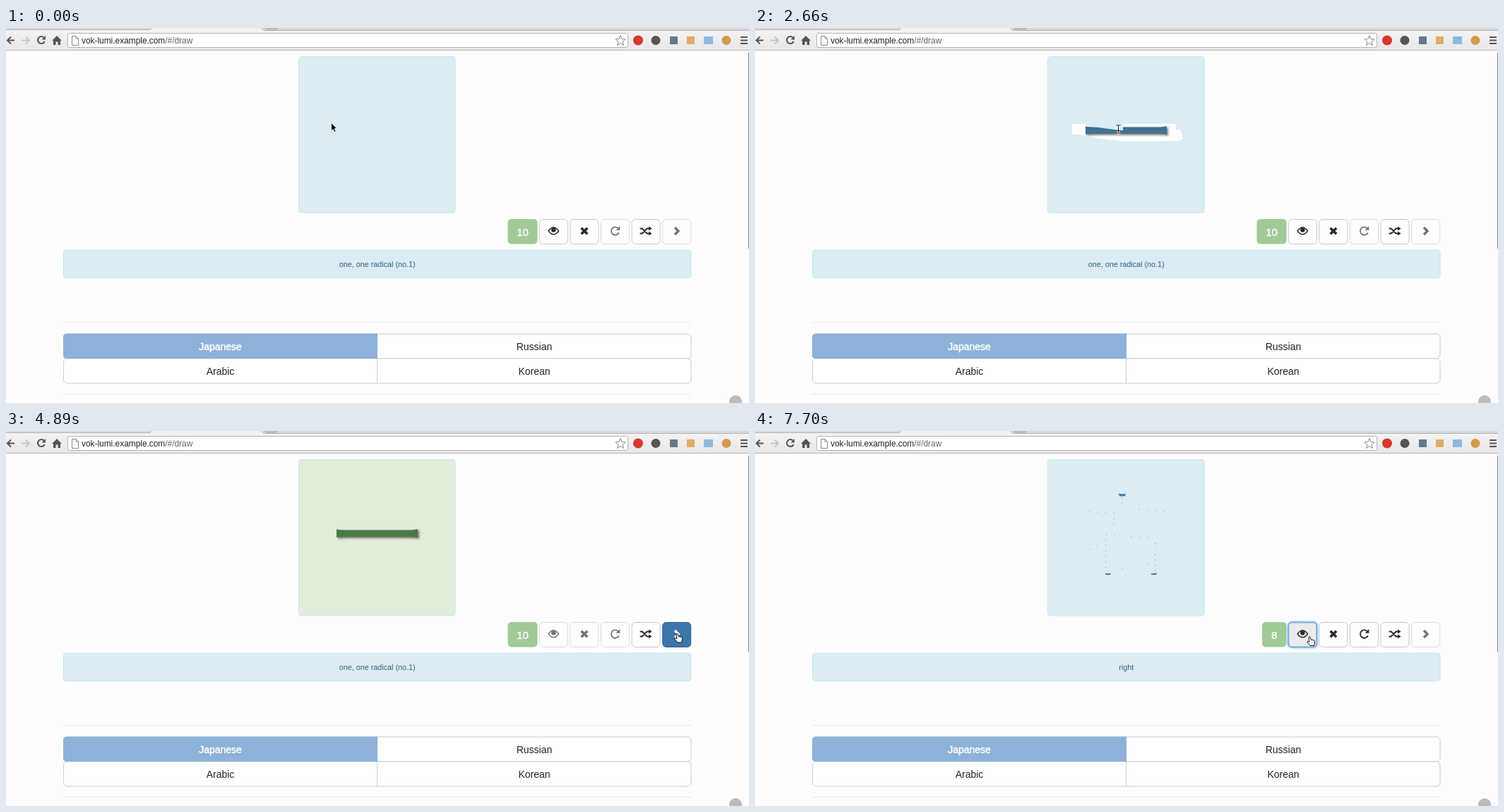
Write an HTML page that moves like this. It is 1052x532 px and loops after 7.99 s.

```html
<!DOCTYPE html>
<html lang="en">
<head>
<meta charset="utf-8">
<title>Character drawing practice</title>
<style>
  html, body { margin: 0; width: 100%; height: 100%; overflow: hidden; background: #fdfdfd; }
  svg { display: block; width: 100%; height: 100%; }
  text { font: 14px "Liberation Sans", Arial, sans-serif; fill: #222; text-anchor: middle; }
  #url { font-size: 11.9px; text-anchor: start; }
  #hint { font-size: 10.8px; fill: #3a5f7a; }
  .light { fill: #fff; stroke: #fff; stroke-width: .4; }
  #badge text { font-size: 15px; }
  .line { fill: none; stroke: currentColor; }
  .info { fill: #dbecf4; stroke: #c3e6ee; }
  .box { fill: #fff; stroke: #ccc; }
  .button { color: #2b2b2b; }
  .button > rect { fill: #fff; stroke: #c8c8c8; }
  .off { opacity: .65; }
  .hover > rect { fill: #ebebeb; stroke: #adadad; }
  .press > rect { fill: #dcdcdc; }
  .go { color: #fff; }
  .go > rect { fill: #4f8cc5; stroke: #427fb9; }
  .go.hover > rect { fill: #3c74ac; stroke: #30608f; }
  .focus > rect { stroke: #79aee8; stroke-width: 2; filter: drop-shadow(0 0 1.5px #66afe9); }
  #bar { filter: drop-shadow(2px 2px 1.5px rgba(0,0,0,.5)); }
  .dots path { fill: none; stroke: #6d91ac; stroke-width: 1; }
  .dots .across { stroke-dasharray: 1 10.7; }
  .dots .down { stroke-dasharray: 1 6.8; }
</style>
</head>
<body>
<svg viewBox="0 0 1052 532" preserveAspectRatio="none">
  <defs>
    <linearGradient id="chrome" x2="0" y2="1">
      <stop stop-color="#f4f4f4"/><stop offset="1" stop-color="#e7e7e7"/>
    </linearGradient>
    <mask id="scratched" maskUnits="userSpaceOnUse" x="414" y="40" width="222" height="222">
      <g fill="none" stroke="#fff" stroke-width="15">
        <path id="sweep1" d="M449 143.5H462L480 148 500 150.5 521 153H596L604 150.5"/>
        <path id="sweep2" d="M596 143.5H466"/>
      </g>
    </mask>
  </defs>

  <!-- browser toolbar -->
  <rect width="1052" height="32" fill="url(#chrome)"/>
  <path d="M0 0H1052V3H0Z" fill="#d8d8d8"/>
  <path d="M207 0H362L365 3H204Z" fill="#f1f1f1"/>
  <path d="M0 2.5H52M203 3.5L206 0M361 0L365 3.5H1052M52 2.5H203M0 31.5H1052" class="line" color="#b5b5b5"/>
  <path d="M366 0H385Q385 3 381 3H370Q367 3 366 0Z" fill="#bbb"/>
  <rect x="87.5" y="7.5" width="793" height="20" rx="2" fill="#fff" stroke="#b4b4b4"/>
  <g class="line" color="#555" stroke-width="2">
    <path d="M12 17.5H2M7 12.5L2 17.5 7 22.5"/>
    <path d="M22 17.5H33M28 12.5L33 17.5 28 22.5" color="#c6c6c6"/>
    <path d="M54.6 19A5 5 0 1 1 53.5 13.5"/>
    <path d="M56 11V16.5H50.5Z" fill="#555" stroke="none"/>
    <path d="M72 11L79 18H77V24H73.500V19.500H70.500V24H67V18H65Z" fill="#555" stroke="none"/>
    <path d="M1040 13H1050M1040 17.500H1050M1040 22H1050"/>
  </g>
  <path d="M93.500 11.500H99L102.500 15V24.500H93.500ZM99 11.500V15H102.500" fill="#fff" stroke="#888"/>
  <path d="M870 10.500L872 15.500 877 16 873 19.500 874.500 24.500 870 21.500 865.500 24.500 867 19.500 863 16 868 15.500Z" fill="#fff" stroke="#888"/>
  <text id="url" x="107" y="22">vok-lumi.example.com<tspan fill="#666">/#/draw</tspan></text>
  <circle cx="895" cy="17.500" r="7" fill="#d8382f"/>
  <circle cx="920" cy="17.500" r="6.500" fill="#555"/>
  <rect x="940" y="12" width="11" height="11" fill="#65788c"/>
  <rect x="964" y="12" width="11" height="11" fill="#e2ab66"/>
  <rect x="988" y="12" width="13" height="11" fill="#8db9df"/>
  <circle cx="1020" cy="17.500" r="6.500" fill="#d39a4e"/>

  <!-- page -->
  <path d="M1051.500 35V313" class="line" color="#8a8a8a"/>
  <circle cx="1033" cy="530" r="9" fill="#bcbcbc"/>
  <path d="M81 417.500H970M81 519.500H970" class="line" color="#e9e9e9"/>
  <rect x="81.500" y="315" width="888.500" height="39.500" rx="4" class="info"/>
  <text id="hint" x="525.700" y="339"></text>

  <rect x="81.500" y="434" width="888.500" height="35" rx="5" class="box"/>
  <rect x="81.500" y="469" width="888.500" height="35" rx="5" class="box"/>
  <path d="M525.500 434V504" class="line" color="#ccc"/>
  <path d="M526 433.500H86Q81 433.500 81 438.500V464Q81 469 86 469H526Z" fill="#8db2d7"/>
  <text x="303.500" y="456.500" class="light">Japanese</text>
  <text x="748" y="456.500">Russian</text>
  <text x="303.500" y="491.500">Arabic</text>
  <text x="748" y="491.500">Korean</text>

  <!-- drawing panel -->
  <rect id="panel" x="414.500" y="40.500" width="221.500" height="221.500" rx="4" class="info"/>
  <g id="reveal">
    <rect id="paper" x="415" y="41" width="220" height="220" fill="#fff"/>
    <path id="bar" d="M468 139.500Q473 140.500 484 140.500H567Q578 140.500 583 139V151Q578 150 567 150H484Q473 150 468 151Z"/>
  </g>
  <g id="starts" fill="#4377a3">
    <path d="M515 88.500L519 89.500 525 89 524 92.500H516Z"/>
    <path d="M495.500 202H504L503 204H496.500ZM560.500 202.500L569 201.500 568 204H561.500Z"/>
  </g>
  <g id="guides" class="dots">
    <path class="across" d="M473 114.500L532 118.500M543 111.500L579 114M497 147.500L567 152M508 194L532 196.500M473 168.500L486 162M555 189.500H556"/>
    <path class="down" d="M519.500 94V104M508 124.500V134M496.500 154V199M566.500 159V200"/>
  </g>

  <g id="badge">
    <rect y="271" height="35.500" rx="5" fill="#a1ca97"/>
    <text y="294.500" class="light"></text>
  </g>
  <g id="buttons"></g>

  <g id="cursor">
    <path id="arrow" d="M0 0V11.500L2.700 9 4.500 13.200 6.500 12.300 4.700 8.300H8Z" fill="#000" stroke="#fff" stroke-width=".8"/>
    <g id="beam" fill="none">
      <path d="M-3-6Q0-6 0-4Q0-6 3-6M0-5V5M-3 6.500Q0 6.500 0 4.500Q0 6.500 3 6.500M-2 2H2" stroke="#fff" stroke-width="2.600"/>
      <path d="M-3-6Q0-6 0-4Q0-6 3-6M0-5V5M-3 6.500Q0 6.500 0 4.500Q0 6.500 3 6.500M-2 2H2" stroke="#111"/>
    </g>
    <path id="hand" d="M-3-5.500Q-2-7.500-.8-5.500L.5-1.500Q2-2.500 3-1.300Q4.500-2 5.200 0Q6 2 5 4V6.500H-1L-5 2Q-5.500 0-3.500 .5L-2 1.500Z" fill="#fff" stroke="#111"/>
  </g>
</svg>
<script>
const DURATION = 7990;
const SUCCESS = 3260, NEXT = 5030, FIRST_HELP = 6660, SECOND_HELP = 7700;
const el = id => document.getElementById(id);
const set = (node, attrs) => { for (const k in attrs) node.setAttribute(k, attrs[k]); };
const show = (id, on) => set(el(id), { display: on ? 'inline' : 'none' });

// Each icon: outline, line weight, solid part; centred on 0,0
const icons = {
  eye: ['M-7.200 0Q0-10.500 7.200 0Q0 9.500-7.200 0Z', 1.4, 'M-3.200-1.500a3.200 3.200 0 1 0 6.400 0a3.200 3.200 0 1 0-6.400 0'],
  clear: ['M-4.300-4.300L4.300 4.300M4.300-4.300L-4.300 4.300', 3.6, ''],
  redo: ['M5.300 2.500A5.700 5.700 0 1 1 4-4.200', 1.8, 'M6.800-7V-1.200H1Z'],
  shuffle: ['M-8.500-3.500H-5.500L1.500 3.500H5M-8.500 3.500H-5.500L1.500-3.500H5', 2, 'M4-6.500L8.500-3.500 4-.5ZM4 .5L8.500 3.500 4 6.500Z'],
  next: ['M-2.700-5L2.300 0-2.700 5', 3.5, '']
};
el('buttons').innerHTML = Object.entries(icons).map(([id, [outline, weight, solid]], i) =>
  `<g id="${id}" class="button" transform="translate(${755.3 + 43.6 * i} 271.5)">
    <rect width="40" height="35" rx="5"/>
    <g transform="translate(20 16.5)">
      <path class="line" d="${outline}" stroke-width="${weight}"/><path fill="currentColor" d="${solid}"/>
    </g></g>`).join('');

// Poses are held until the next key: time, shape, x, y
const cursorKeys = [
  [0, 'arrow', 460.5, 134.5], [150, 'arrow', 458, 136], [290, 'arrow', 456, 137],
  [440, 'beam', 456, 143], [880, 'beam', 468, 146], [1030, 'beam', 500, 150],
  [1180, 'beam', 534, 152], [1330, 'beam', 568, 152], [1480, 'beam', 591.5, 152.5],
  [1630, 'beam', 596, 151], [1930, 'beam', 596, 145], [2080, 'beam', 590, 143],
  [2220, 'beam', 578, 143], [2370, 'beam', 560, 143], [2520, 'beam', 538, 143],
  [2660, 'beam', 514.5, 143.5], [2810, 'beam', 488, 143], [2960, 'beam', 472, 143],
  [3110, 'beam', 462, 144], [3260, 'arrow', 460, 138], [3560, 'arrow', 510, 160],
  [3710, 'arrow', 650, 215], [3860, 'arrow', 810, 262], [4150, 'arrow', 872, 282],
  [4300, 'hand', 936, 292], [4450, 'hand', 947, 293], [4590, 'hand', 952, 293.5],
  [5480, 'hand', 858, 297], [5630, 'hand', 758, 297.5], [5780, 'arrow', 744, 290],
  [5930, 'hand', 760, 297], [6070, 'hand', 776, 298], [6220, 'hand', 787, 298]
];
// Right edge of the first sweep, then left edge of the second
const sweep1Keys = [[0, 449], [580, 466], [880, 478], [1030, 508], [1180, 540], [1330, 573], [1480, 596], [1630, 601], [1780, 604]];
const sweep2Keys = [[0, 596], [2080, 582], [2220, 576], [2370, 562], [2520, 544], [2660, 521], [2810, 495], [2960, 476], [3110, 466]];
const held = (keys, t) => keys.findLast(key => key[0] <= t).slice(1);
const within = (t, ...starts) => starts.some(s => t >= s && t < s + 150);

function trim(id, length) {
  set(el(id), { 'stroke-dasharray': `${length} 999`, visibility: length > 0 ? 'visible' : 'hidden' });
}

function style(id, states) {
  const on = Object.keys(states).filter(name => states[name]);
  set(el(id), { class: ['button', ...on].join(' ') });
}

function draw(t) {
  const done = t >= SUCCESS && t < NEXT;
  const [shape, x, y] = held(cursorKeys, t);
  set(el('cursor'), { transform: `translate(${x} ${y})` });
  ['arrow', 'beam', 'hand'].forEach(id => show(id, id === shape));

  trim('sweep1', (held(sweep1Keys, t)[0] - 449) * 1.01);
  trim('sweep2', 596 - held(sweep2Keys, t)[0]);
  show('reveal', t < NEXT);
  show('paper', !done);
  set(el('reveal'), { mask: done ? 'none' : 'url(#scratched)' });
  set(el('bar'), { fill: done ? '#4b7845' : '#417391' });
  el('panel').style.fill = done ? '#e1ecd9' : '#dbecf4';
  show('starts', t >= FIRST_HELP);
  show('guides', t >= SECOND_HELP);

  el('hint').textContent = t < NEXT ? 'one, one radical (no.1)' : 'right';
  const score = t < FIRST_HELP ? 10 : t < SECOND_HELP ? 9 : 8;
  const left = score > 9 ? 710.5 : 718;
  const [plate, label] = el('badge').children;
  set(plate, { x: left, width: 752.5 - left });
  set(label, { x: (left + 752.5) / 2 });
  label.textContent = score;

  const overEye = shape === 'hand' && x > 755 && x < 796;
  style('eye', { off: done, hover: overEye, focus: t >= 6510, press: within(t, 6510, 7110, 7550) });
  style('clear', { off: done });
  style('redo', { off: t < FIRST_HELP });
  style('next', { off: !done, go: done, hover: done && shape === 'hand', focus: t >= NEXT && t < 6510 });
}

function frame() {
  draw(performance.now() % DURATION);
  requestAnimationFrame(frame);
}
frame();
</script>
</body>
</html>
```
